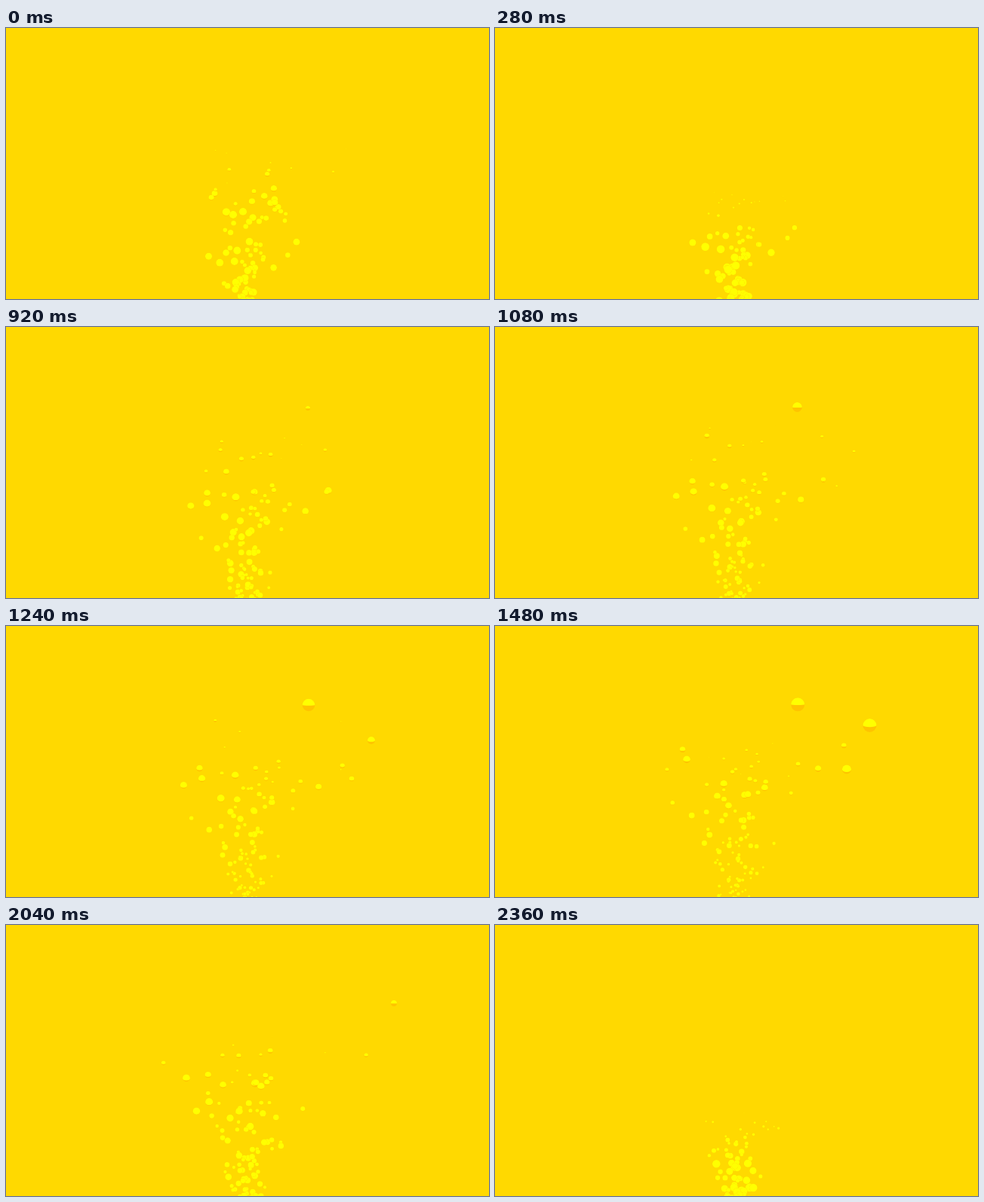
Animation, 640 px wide and 360 px high, one loop 2400 ms. Source, as an HTML page with a canvas:

```html
<!DOCTYPE html>
<html lang="en">
<head>
<meta charset="utf-8">
<title>Yellow fountain</title>
<style>
  html, body { margin: 0; width: 100%; height: 100%; overflow: hidden; background: #ffd900; }
  canvas { display: block; width: 640px; height: 360px; }
</style>
</head>
<body>
<canvas id="stage" width="640" height="360"></canvas>
<script>
const ctx = document.getElementById('stage').getContext('2d');
const LOOP = 2400, STEP = 40, LIFE = 3200, LOW = 520;
const SOURCE = { x: 316, y: 366 };

let seed = 77;
function rand() {
  seed = (seed * 16807) % 2147483647;
  return seed / 2147483647;
}
const bell = () => rand() + rand() + rand() - 1.5;
const clamp = v => Math.max(0, Math.min(1, v));
const mix = (a, b, k) => a + (b - a) * k;

// 0: only the foot of the fountain shows, 1: the whole cloud
function swell(t) {
  if (t < LOW) return .5 * (1 - t / LOW);
  return Math.sin(Math.PI * (t - LOW) / (LOOP - LOW)) ** .8;
}

const drops = [];
for (let birth = -LIFE; birth < LOOP; birth += 29) {
  drops.push({
    birth: birth + rand() * 29,
    x: SOURCE.x + bell() * 22,
    lean: bell() * .52 + .06,
    rise: 170 + 105 * rand(),
    size: 5 + 6 * rand()
  });
}

// Large outliers, each moving between two points
const outliers = [
  { from: [400, 108], to: [401, 105], start: 920, end: 1240, size: 18 },
  { from: [484, 152], to: [509, 112], start: 1240, end: 1720, size: 18 },
  { from: [458, 203], to: [474, 178], start: 1240, end: 1720, size: 12 }
];

// A ball lit from above; the shaded part grows with height
function ball(x, y, d) {
  const r = d / 2;
  if (r < .4) return;
  const lit = clamp((y - 90) / 170);
  ctx.fillStyle = '#ffc400';
  ctx.beginPath();
  ctx.arc(x, y, r, 0, 2 * Math.PI);
  ctx.fill();
  ctx.fillStyle = '#ff0';
  ctx.beginPath();
  ctx.arc(x, y, r, Math.PI, 2 * Math.PI);
  ctx.ellipse(x, y, r, r * lit, 0, 0, Math.PI);
  ctx.fill();
}

function drawDrop(p, t, m) {
  const u = (t - p.birth) / LIFE;
  if (u < 0 || u > 1) return;
  const h = p.rise * u ** 1.5;
  const reach = 100 + 240 * m;
  const fade = clamp((reach - h) / 80) * clamp((1 - u) * 8);
  const young = 1 - .65 * m * m * (1 - u);
  ball(p.x + p.lean * h, SOURCE.y - h, p.size * fade * young);
}

function drawOutlier(p, t, m) {
  let k = (t - p.start) / (p.end - p.start);
  if (k > 1) k = 1 + (k - 1) * .3;
  const fade = clamp((t - p.start + 300) / 500) * clamp((p.end + 450 - t) / 150);
  ball(mix(p.from[0], p.to[0], k), mix(p.from[1], p.to[1], k), p.size * fade * m ** 1.5);
}

function draw(t) {
  const m = swell(t);
  ctx.fillStyle = '#ffd900';
  ctx.fillRect(0, 0, 640, 360);
  drops.forEach(p => drawDrop(p, t, m));
  outliers.forEach(p => drawOutlier(p, t, m));
}

function frame() {
  const t = performance.now() % LOOP;
  draw(Math.floor(t / STEP) * STEP);
  requestAnimationFrame(frame);
}
frame();
</script>
</body>
</html>
```
